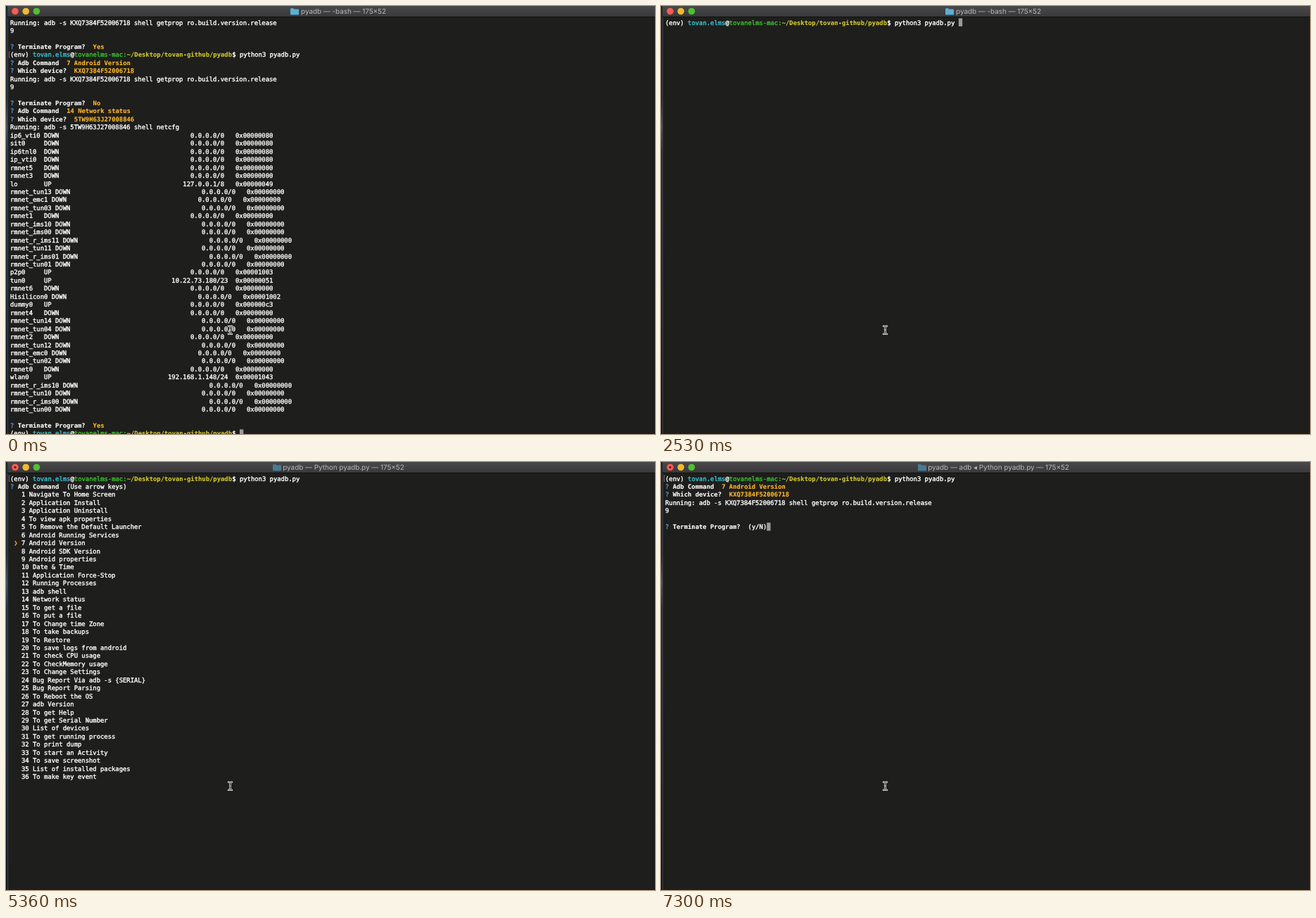
Recreate the animation shown at these times as an HTML page. Size 922 px wide and 608 px high, loop 8 s.

```html
<!DOCTYPE html>
<html lang="en">
<head>
<meta charset="utf-8">
<title>Terminal session</title>
<style>
  html, body { margin: 0; width: 100%; height: 100%; overflow: hidden; background: #1e1e1d; }
  svg { display: block; width: 922px; height: 608px; }
  text { white-space: pre; text-rendering: geometricPrecision; }
  #screen { font: 8.877px "DejaVu Sans Mono", monospace; color: #fff; }
  #screen text { fill: currentColor; stroke: currentColor; stroke-width: .38px; }
  #title { font: 9.9px Inter, "Liberation Sans", sans-serif; fill: #b9b9ba; text-anchor: middle; }
  #screen .bold, #screen .path, #screen .answer { font-weight: bold; stroke-width: .12px; }
  .user { color: #38c8d6; }
  .host { color: #3cc42c; }
  .path { color: #d3c92c; }
  .mark { color: #6391bb; }
  .answer { color: #ffb726; }
</style>
</head>
<body>
<svg viewBox="0 0 922 608">
  <defs>
    <linearGradient id="bar" x2="0" y2="1">
      <stop stop-color="#49494b"/><stop offset="1" stop-color="#39393b"/>
    </linearGradient>
    <linearGradient id="desktop" x2="0" y2="1">
      <stop stop-color="#18222f"/><stop offset=".22" stop-color="#1d2b3c"/>
      <stop offset=".28" stop-color="#435365"/><stop offset=".34" stop-color="#1f3044"/>
      <stop offset=".6" stop-color="#182a42"/><stop offset="1" stop-color="#0e1622"/>
    </linearGradient>
    <path id="beam" d="M316 454.8q2 0 2.5 1.5q.5-1.5 2.5-1.5M318.5 456.3V464.5M316 466q2 0 2.5-1.5q.5 1.5 2.5 1.5"/>
  </defs>
  <rect width="922" height="608" fill="#1e1e1d"/>
  <rect width="2" height="608" fill="url(#desktop)"/>
  <rect x="2" width="1" height="608" fill="#3f4142"/>
  <rect x="2" width="920" height="15" fill="url(#bar)"/>
  <rect x="2" y="15" width="920" height="1" fill="#111"/>
  <circle cx="13" cy="7.5" r="4.8" fill="#fc5b54"/>
  <circle cx="28.2" cy="7.5" r="4.8" fill="#f0b92e"/>
  <circle cx="43.4" cy="7.5" r="4.8" fill="#50c12f"/>
  <circle id="busy" cx="13" cy="7.5" r="1.6" fill="#5a0f0c"/>
  <path id="folder" d="M0 4.2q0-1 1-1h3l1.2 1.2h5.8q1 0 1 1v6q0 1-1 1h-10q-1 0-1-1z"/>
  <text id="title" x="479.5" y="11.2"></text>
  <g id="screen"></g>
  <g fill="none" stroke-linecap="round">
    <use href="#beam" stroke="#f2f2f2" stroke-width="2.4"/>
    <use href="#beam" stroke="#161616" stroke-width=".9"/>
    <path id="tick" d="M317.3 460.2h2.4" stroke="#e8e8e8" stroke-width="1"/>
  </g>
</svg>
<script>
const LOOP = 8000, CELL = 5.344, ROW = 11.45, LEFT = 6, TOP = 17.5;
const FIRST = '5TW9H63J27008846', SECOND = 'KXQ7384F52006718';
const $ = id => document.getElementById(id);

// A line is a list of [text, style] runs.
const plain = text => [[text, '']];
const prompt = command => [
  ['(env) ', ''], ['tovan.elms', 'user'], ['@', ''], ['tovanelms-mac:', 'host'],
  ['~/Desktop/tovan-github/pyadb', 'path'], ['$ ' + command, '']
];
const ask = (question, reply, style = 'answer') =>
  [['?', 'mark'], [` ${question}  `, 'bold'], [reply, style]];
const choice = (text, active) =>
  [[' ', ''], [active ? '❯' : ' ', 'answer'], [' ' + text, '']];

const menu = `Navigate To Home Screen
Application Install
Application Uninstall
To view apk properties
To Remove the Default Launcher
Android Running Services
Android Version
Android SDK Version
Android properties
Date & Time
Application Force-Stop
Running Processes
adb shell
Network status
To get a file
To put a file
To Change time Zone
To take backups
To Restore
To save logs from android
To check CPU usage
To CheckMemory usage
To Change Settings
Bug Report Via adb -s {SERIAL}
Bug Report Parsing
To Reboot the OS
adb Version
To get Help
To get Serial Number
List of devices
To get running process
To print dump
To start an Activity
To save screenshot
List of installed packages
To make key event`.split('\n').map((label, i) => `${i + 1} ${label}`);

// name,flags,state,address; omitted fields take the idle defaults
const interfaces = `ip6_vti0,80 sit0,80 ip6tnl0,80 ip_vti0,80 rmnet5 rmnet3 lo,49,UP,127.0.0.1/8
rmnet_tun13 rmnet_emc1 rmnet_tun03 rmnet1 rmnet_ims10 rmnet_ims00 rmnet_r_ims11 rmnet_tun11
rmnet_r_ims01 rmnet_tun01 p2p0,1003,UP tun0,51,UP,10.22.73.180/23 rmnet6 Hisilicon0,1002
dummy0,c3,UP rmnet4 rmnet_tun14 rmnet_tun04 rmnet2 rmnet_tun12 rmnet_emc0 rmnet_tun02 rmnet0
wlan0,1043,UP,192.168.1.148/24 rmnet_r_ims10 rmnet_tun10 rmnet_r_ims00 rmnet_tun00`.split(/\s+/);

function interfaceLine(entry) {
  const [name, flags = '', state = 'DOWN', address = '0.0.0.0/0'] = entry.split(',');
  const [ip, bits] = address.split('/');
  return plain(name.padEnd(8) + ' ' + state.padEnd(46 - ip.length) + ip + '/' +
    bits.padEnd(2) + '  0x' + flags.padStart(8, '0'));
}

const launch = prompt('python3 pyadb.py');
const versionAsked = ask('Adb Command', '7 Android Version');
const versionOutput = [plain(`Running: adb -s ${SECOND} shell getprop ro.build.version.release`), plain('9'), []];
const versionRun = [versionAsked, ask('Which device?', SECOND), ...versionOutput];
const history = [
  ...versionOutput, ask('Terminate Program?', 'Yes'),
  launch, ...versionRun, ask('Terminate Program?', 'No'),
  ask('Adb Command', '14 Network status'), ask('Which device?', FIRST),
  plain(`Running: adb -s ${FIRST} shell netcfg`),
  ...interfaces.map(interfaceLine), [], ask('Terminate Program?', 'Yes')
];

// Each scene: start time, lines, cursor visibility, row of the bracketed prompt.
const scene = (start, lines, cursor = true, bracket = 0) => ({ start, lines, cursor, bracket });
const typing = (start, text) => scene(start, [...history, prompt(text)], true, 4);
const picking = (start, index) => scene(start, [
  launch, ask('Adb Command', '(Use arrow keys)', ''), ...menu.map((item, i) => choice(item, i === index))
], false);
const device = (start, index) => scene(start, [
  launch, versionAsked, ask('Which device?', '(Use arrow keys)', ''),
  ...[FIRST, SECOND].map((id, i) => choice(id, i === index))
], false);

const scenes = [
  typing(0, ''), typing(750, 'c'), typing(900, 'cl'), typing(1040, 'cle'), typing(1190, 'clear'),
  scene(1630, [prompt('')], true, -1),
  scene(2230, [prompt('clear')], true, -1),
  scene(2530, [prompt('python3 pyadb.py ')], true, -1),
  scene(2970, [launch, []]),
  ...[3420, 4460, 4760, 4910, 5060, 5210, 5360].map(picking),
  ...[6110, 6850].map(device),
  scene(7300, [launch, ...versionRun, ask('Terminate Program?', '(y/N)', '')])
];
const titles = [
  { start: 0, text: '-bash', folder: 404 },
  { start: 3120, text: 'Python pyadb.py', folder: 379 },
  { start: 6250, text: 'adb ◂ Python pyadb.py', folder: 365 }
];

const current = (list, time) => list.findLast(item => item.start <= time);
const escapeText = text => text.replace(/&/g, '&amp;').replace(/</g, '&lt;');
const width = line => line.reduce((sum, [text]) => sum + text.length, 0);

function drawLine(line, row) {
  let column = 0;
  return line.map(([text, style]) => {
    const x = LEFT + column * CELL;
    column += text.length;
    return `<text x="${x}" y="${TOP + 9 + row * ROW}" class="${style}">${escapeText(text)}</text>`;
  }).join('');
}

function drawScene({ lines, cursor, bracket }) {
  let markup = '';
  const last = lines.length - 1;
  if (cursor) {
    markup += `<rect x="${LEFT + width(lines[last]) * CELL}" y="${TOP + last * ROW}" width="5.3" height="11.4" fill="#9b9b9b"/>`;
  }
  if (bracket >= 0) {
    markup += `<path d="M6 ${TOP + 1.8 + bracket * ROW}h-1.5v8h1.5" fill="none" stroke="#858585" stroke-width=".7"/>`;
  }
  $('screen').innerHTML = markup + lines.map(drawLine).join('');
}

function drawTitle({ start, text, folder }) {
  $('title').textContent = `pyadb — ${text} — 175×52`;
  $('folder').setAttribute('transform', `translate(${folder} 0)`);
  $('folder').setAttribute('fill', start ? '#487b94' : '#5bafd6');
  $('busy').style.display = start ? '' : 'none';
}

let shownScene, shownTitle;
function render(now) {
  const time = now % LOOP;
  const nextScene = current(scenes, time), nextTitle = current(titles, time);
  if (nextScene !== shownScene) drawScene(shownScene = nextScene);
  if (nextTitle !== shownTitle) drawTitle(shownTitle = nextTitle);
  $('tick').style.opacity = time >= 3270 && time < 7150 ? .45 : .8;
}

const origin = performance.now();
function frame() {
  render(performance.now() - origin);
  requestAnimationFrame(frame);
}
frame();
</script>
</body>
</html>
```
